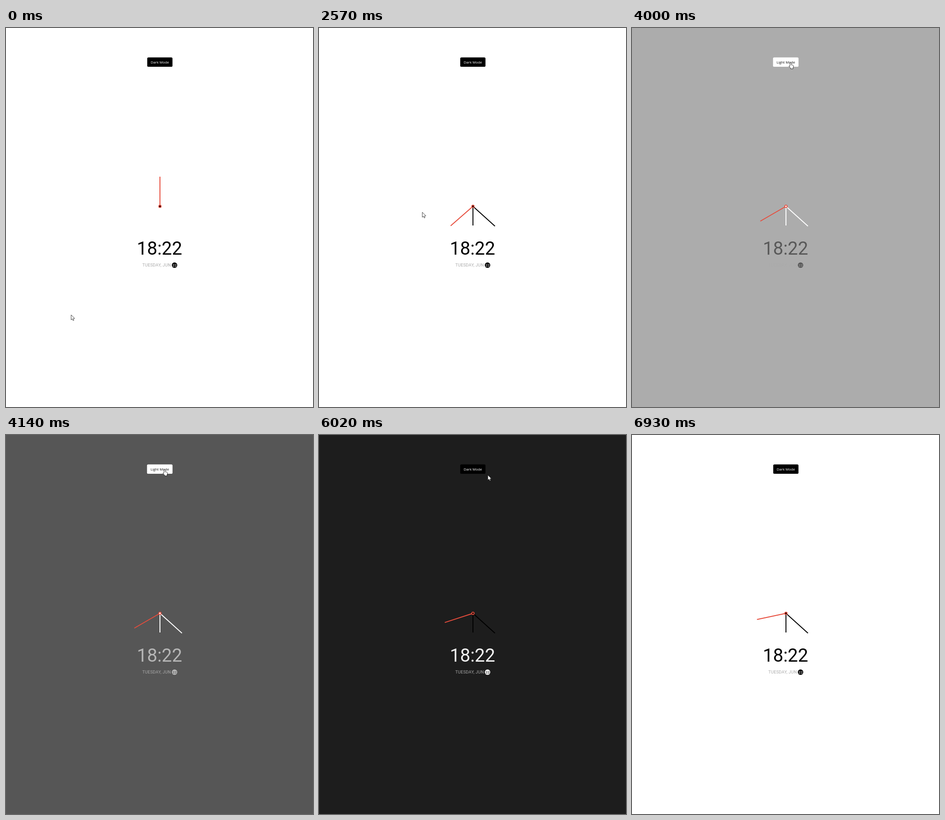
Animation of 674x831 px, one loop 7.26 s. Source, as an HTML page:

```html
<!DOCTYPE html>
<html lang="en">
<head>
<meta charset="utf-8">
<title>Theme clock</title>
<style>
  html, body { margin: 0; width: 100%; height: 100%; overflow: hidden; }
  svg { display: block; width: 100%; height: 100%; }
  text { font-family: Roboto, sans-serif; }
  #label { font: 7.75px "Open Sans", "Noto Sans", sans-serif; text-anchor: middle; }
  #date { font-size: 9.3px; letter-spacing: .2px; fill: #aaa; }
  #time { font-size: 40px; text-anchor: middle; }
  #day { font-size: 8px; letter-spacing: .2px; text-anchor: middle; }
  #arrow, #hand { fill: #fff; stroke: #111; stroke-width: .8; stroke-linejoin: round; }
</style>
</head>
<body>
<svg id="stage" viewBox="0 0 674 831">
  <rect id="button" y="64.5" height="20.5" rx="2.6"/>
  <text id="label" x="337.8" y="77.8"></text>

  <g transform="translate(338 391)" stroke-width="2">
    <path id="hour" d="M0 0V-42"/>
    <path id="minute" d="M0 0V-65"/>
    <path id="second" d="M0 0V-65" stroke="#e74c3c"/>
    <circle r="3.5" fill="#e74c3c"/>
    <circle id="hub" r="1.8"/>
  </g>

  <text id="time" x="337" y="497">18:22</text>
  <text id="date" x="299.2" y="523">TUESDAY, JUN</text>
  <circle id="badge" cx="370" cy="520" r="6"/>
  <text id="day" x="370.2" y="522.9">22</text>

  <circle id="press" cx="347.5" cy="75" r="8" fill="#d6ce00" opacity=".75"/>
  <g id="cursor">
    <path id="arrow" d="M0 0V11L2.5 8.8L4.2 12.5L6 11.8L4.5 8.2L7.8 7.9Z"/>
    <path id="hand" d="M-1.3 1.2Q0 -.4 1.3 1.2V5.5L5.2 6.4Q6.7 7 6.5 9L5.6 12V14.5H.2V13L-3.4 9.3Q-3.6 7.6 -1.3 8.8Z"/>
  </g>
</svg>
<script>
const LOOP = 7260;
const TICKS = [560, 1490, 2520, 3550, 4580, 5600, 6600];
const TICK_TIME = 160, FADE_TIME = 500;
const TO_DARK = 3735, TO_LIGHT = 5930;
const FIRST_SECOND = 37;
// Pointer stops: time, x, y
const STOPS = [
  [0, 143, 629], [1490, 143, 629], [1500, 144, 629], [2300, 144, 629],
  [2920, 348, 75], [5950, 348, 75], [6240, 441, 128], [6500, 491, 259], [LOOP, 491, 259]
];

const $ = id => document.getElementById(id);
const set = (id, name, value) => $(id).setAttribute(name, value);
const show = (id, on) => set(id, 'visibility', on ? 'visible' : 'hidden');
const clamp = x => Math.min(1, Math.max(0, x));
const mix = (a, b, k) => a + (b - a) * k;
const gray = v => `rgb(${[v, v, v].map(Math.round)})`;

// cubic-bezier(.42, 0, 1, 1)
function easeIn(x) {
  let lo = 0, hi = 1;
  for (let i = 0; i < 20; i++) {
    const s = (lo + hi) / 2;
    const bx = 1.26 * s * (1 - s) ** 2 + 3 * s * s * (1 - s) + s ** 3;
    if (bx < x) lo = s; else hi = s;
  }
  return lo * lo * (3 - 2 * lo);
}
const phase = (t, start, length) => easeIn(clamp((t - start) / length));

function pointer(t) {
  const i = STOPS.findIndex((s, n) => n > 0 && t <= s[0]);
  const [t0, x0, y0] = STOPS[i - 1], [t1, x1, y1] = STOPS[i];
  const u = (t - t0) / (t1 - t0);
  const k = t1 === 2920 ? u * u * (3 - 2 * u) : u;
  return [mix(x0, x1, k), mix(y0, y1, k)];
}

function drawClock(t) {
  const sweep = phase(t, TICKS[0], TICK_TIME);
  const angle = TICKS.slice(1).reduce(
    (sum, start) => sum + 6 * phase(t, start, TICK_TIME), FIRST_SECOND * 6 * sweep);
  set('second', 'transform', `rotate(${angle})`);
  set('minute', 'transform', `rotate(${132 * sweep})`);
  set('hour', 'transform', `rotate(${180 * sweep})`);
}

function drawTheme(t) {
  const dark = t >= TO_DARK && t < TO_LIGHT;
  const fade = phase(t, TO_DARK, FADE_TIME) - phase(t, TO_LIGHT, FADE_TIME);
  const ink = dark ? '#fff' : '#000';
  $('stage').style.background = gray(mix(255, 17, fade));
  set('time', 'fill', gray(255 * fade));
  set('badge', 'fill', gray(255 * fade));
  set('day', 'fill', gray(255 * (1 - fade)));
  set('hour', 'stroke', ink);
  set('minute', 'stroke', ink);
  set('hub', 'fill', ink);
  set('button', 'fill', ink);
  set('button', 'x', dark ? 309.6 : 310.1);
  set('button', 'width', dark ? 56 : 55.4);
  set('label', 'fill', dark ? '#111' : '#fff');
  $('label').textContent = dark ? 'Light Mode' : 'Dark Mode';
}

function drawPointer(t) {
  const [x, y] = pointer(t);
  const over = x > 310 && x < 365 && y > 64 && y < 85;
  const visible = t < 6930;
  set('cursor', 'transform', `translate(${x} ${y})`);
  show('arrow', visible && !over);
  show('hand', visible && over);
  show('press', [TO_DARK, TO_LIGHT].some(end => t >= end - 90 && t < end));
}

const begin = performance.now();
function frame() {
  const t = (performance.now() - begin) % LOOP;
  drawClock(t);
  drawTheme(t);
  drawPointer(t);
  requestAnimationFrame(frame);
}
frame();
</script>
</body>
</html>
```
